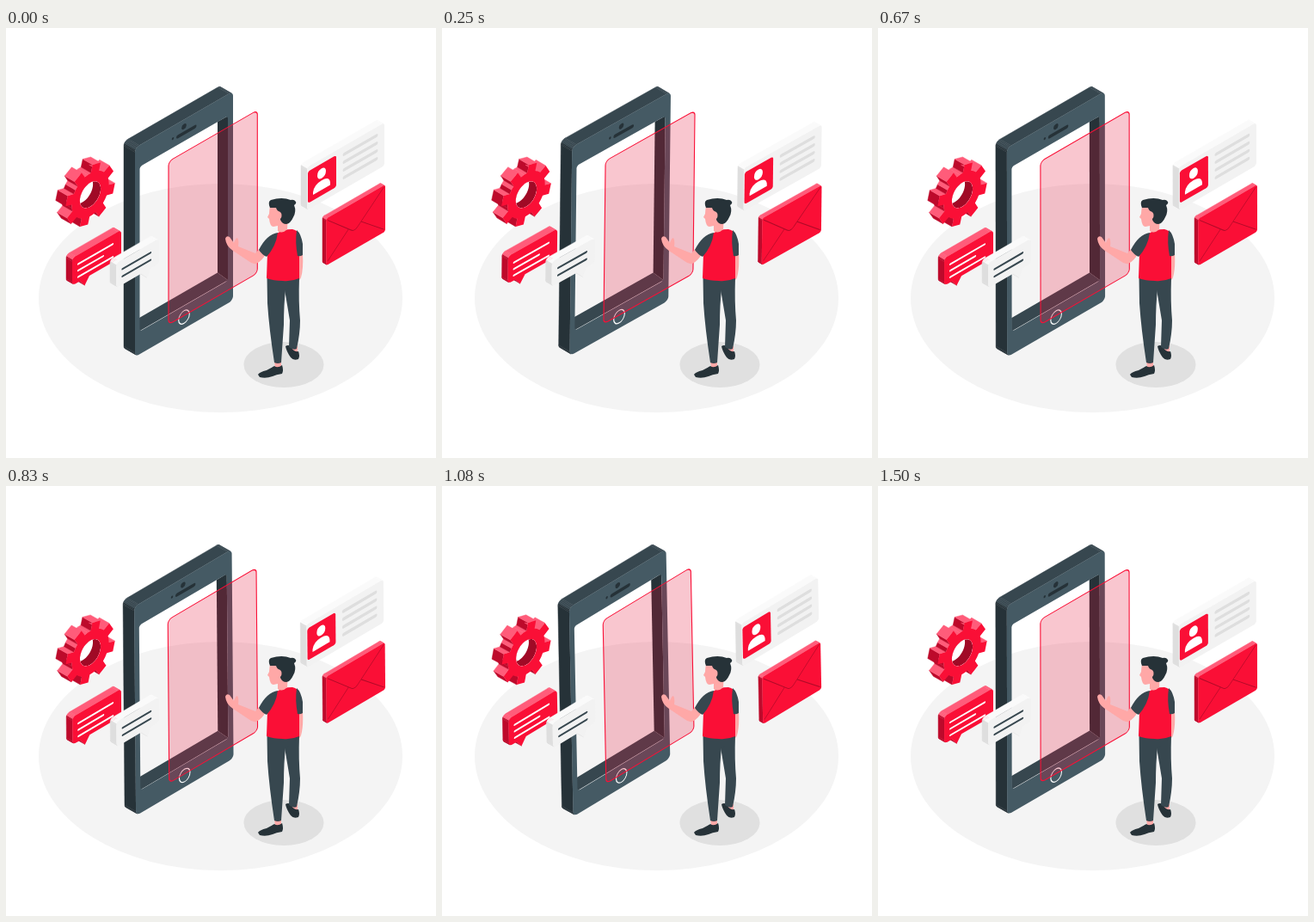
These frames come from a looping animation (500x500 px, 1540 ms). An HTML page:

```html
<!DOCTYPE html>
<html lang="en">
<head>
<meta charset="utf-8">
<style>
html, body { margin: 0; height: 100%; overflow: hidden; background: #fff; }
svg { display: block; width: 100vw; height: 100vh; }
</style>
</head>
<body>
<svg viewBox="0 0 500 500">
  <ellipse cx="249.5" cy="314" rx="211.5" ry="133" fill="#f4f4f4"/>
  <ellipse cx="323" cy="391.5" rx="46.5" ry="26.5" fill="#e0e0e0"/>
  <g id="gear"></g>
  <g id="scene"></g>
  <g id="envelope"></g>
  <g id="man">
    <path fill="#ffa8a7" d="M339 262L345 262Q346 280 343 290Q341 296 338 291Q341 280 339 262ZM303 261Q298 271 291 274Q287 275 282 271L264 259Q256 254 255 245Q256 241 260 243L265 250Q267 244 269 244Q271 246 270 254L290 262L297 254ZM312 387L320 387L320 395L313 395ZM331 368L339 370L339 380L333 379Z"/>
    <path fill="#263238" d="M293 403Q295 400 303 398Q309 395 312 393Q316 396 321 392Q323 398 321 402Q314 403 310 405Q302 408 295 406ZM325 370Q328 368 331 370Q334 377 340 376Q342 381 340 385Q334 387 331 383Q326 376 325 370Z"/>
    <path fill="#37474f" d="M322 290L341 290Q340 318 342 340Q342 355 338 373Q334 375 329 371L330 340L324 304Z"/>
    <path fill="#37474f" d="M303.500 288L338 291Q336 301 325 304Q323 322 323 345L320 389Q316 391 312 389Q306 350 304 320Z"/>
    <path fill="#fa0f36" d="M315 239Q322 234 333 234Q340 235 341 242L341 291Q332 295 322 294Q311 294 303 291L304 262Z"/>
    <path fill="#37474f" d="M316 238Q314 254 303 266Q297 263 294 258Q303 240 316 238ZM338 235Q343 239 345 251L345 264Q342 266 339 265Q336 249 338 235Z"/>
    <path fill="#ffa8a7" d="M307 207Q306 213 306 216L304 220L306 222Q307 231 311 231L316 230L316 236Q321 240 327 234L328 216L320 205Z"/>
    <path fill="#263238" d="M307 209Q304 202 308 200Q321 196 331 200Q335 199 337 202Q338 204 335 206Q338 213 334 220Q331 227 326 228Q321 228 319 223L319 214Q315 213 314 209Z"/>
    <ellipse cx="317" cy="218" rx="3.500" ry="4.200" fill="#ffa8a7"/>
  </g>
</svg>
<script>
const SLOPE = 0.577, PERIOD = 1540;
const RED = ['#fa0f36', '#ff5c7a', '#bd0a2b'];
const WHITE = ['#f2f2f2', '#fafafa', '#dedede'];
const METAL = ['#455a64', '#37474f', '#263238'];
const byId = id => document.getElementById(id);

const outline = points => 'M' + points.map(p => p.map(n => n.toFixed(2))).join('L') + 'Z';
const path = (d, attrs) => `<path d="${d}" ${attrs}/>`;
const lines = (d, color, width) =>
  path(d, `fill="none" stroke="${color}" stroke-width="${width}" stroke-linecap="round" stroke-linejoin="round"`);
const oval = (x, y, rx, ry, attrs) => `<ellipse cx="${x}" cy="${y}" rx="${rx}" ry="${ry}" ${attrs}/>`;

// Points of a rounded rectangle, clockwise, with an optional tail on the bottom edge.
function roundRect(x, y, w, h, r, tail = []) {
  const corner = (cx, cy, from) => [0, 1, 2, 3, 4, 5, 6].map(i => {
    const a = (from + i * 15) * Math.PI / 180;
    return [cx + r * Math.cos(a), cy + r * Math.sin(a)];
  });
  return [...corner(x + r, y + r, 180), ...corner(x + w - r, y + r, 270),
    ...corner(x + w - r, y + h - r, 0), ...tail, ...corner(x + r, y + h - r, 90)];
}

function gearPoints(inner, outer) {
  const points = [];
  for (let k = 0; k < 8; k++) {
    for (const [turn, r] of [[-13, inner], [-9.5, outer], [9.5, outer], [13, inner], [22.5, inner]]) {
      const a = (k * 45 - 30 + turn) * Math.PI / 180;
      points.push([0.866 * r * Math.cos(a), r * Math.sin(a)]);
    }
  }
  return points;
}

const ring = (r, dx = 0, dy = 0) => Array.from({ length: 40 }, (_, i) => {
  const a = i * Math.PI / 20;
  return [dx + 0.866 * r * Math.cos(a), dy + r * Math.sin(a)];
});

// Upright isometric plane: x runs up to the right, y straight down.
const plane = (x, y, content) => `<g transform="matrix(1 ${-SLOPE} 0 1 ${x} ${y})">${content}</g>`;

// Front face plus the visible top and left walls; holes are cut out of the face.
function slab(points, depth, [face, top, side], hole = []) {
  const dx = -depth, dy = -depth * 2 * SLOPE;
  let walls = '';
  points.forEach(([ax, ay], i) => {
    const [bx, by] = points[(i + 1) % points.length];
    const nx = by - ay, ny = ax - bx;
    if (nx * dx + ny * dy <= 0) return;
    const color = ny < -Math.abs(nx) * 0.7 ? top : side;
    const quad = [[ax, ay], [bx, by], [bx + dx, by + dy], [ax + dx, ay + dy]];
    walls += path(outline(quad), `fill="${color}" stroke="${color}" stroke-width=".4"`);
  });
  const cut = hole.length ? outline(hole) : '';
  return walls + path(outline(points) + cut, `fill="${face}" fill-rule="evenodd"`);
}

byId('gear').innerHTML = plane(98, 193.8,
  `<clipPath id="bore">${path(outline(ring(14)), '')}</clipPath>` +
  path(outline(ring(14)) + outline(ring(14, -9, -10.4)), 'fill="#a00a26" fill-rule="evenodd" clip-path="url(#bore)"') +
  slab(gearPoints(25, 33.3), 11.5, RED, ring(14)));

const phone = plane(150, 139.5,
  path('M108 25V216L96 200.500V25Z', 'fill="#263238"') +
  path('M5 216H108L96 200.500H5Z', 'fill="#37474f"') +
  slab(roundRect(0, 0, 114, 243, 5), 13, METAL, roundRect(5.5, 25, 102.5, 191.5, 3)) +
  lines('M50 15.500H69.500', '#263238', 4) +
  oval(57, 8, 2.8, 3, 'fill="#263238"') + oval(44, 14.5, 1.2, 1.4, 'fill="#263238"') +
  oval(57, 229.5, 6.3, 7.3, 'fill="none" stroke="#fff" stroke-width="1.1"'));

const glass = plane(189, 155.2, path(outline(roundRect(0, 0, 103.3, 189.5, 5)),
  'fill="#e60c33" fill-opacity=".23" stroke="#fa0f36" stroke-width="1.1"'));

const redBubble = plane(77, 267.5,
  slab(roundRect(0, 0, 57, 32, 4, [[20, 32], [14.5, 40], [9, 32]]), 7, RED) +
  lines('M7 11H47M7 18.500H36M7 26H47', '#fff', 2.2));

const whiteBubble = plane(128, 273.5,
  slab(roundRect(0, 0, 50, 29, 4, [[40, 29], [36, 37.5], [29, 29]]), 7, WHITE) +
  lines('M7.500 11H40M7.500 19.500H40', '#37474f', 2.3));

const card = plane(350, 162,
  slab(roundRect(0, 0, 90, 50, 3), 7, WHITE) +
  path(outline(roundRect(1, 5.5, 33, 37, 2.5)), 'fill="#fa0f36"') +
  oval(17, 16.8, 5, 5.8, 'fill="#fff"') +
  path('M7 36V33Q8 25 17 25Q26 25 27 33V36Z', 'fill="#fff"') +
  lines('M43.500 9.800H80.500M43.500 18.800H80.500M43.500 27.800H80.500M43.500 36.800H80.500', '#dedede', 3.8));

byId('scene').innerHTML = phone + glass + redBubble + whiteBubble + card;

byId('envelope').innerHTML = plane(372.3, 221.8,
  slab(roundRect(0, 0, 68.7, 54.5, 2.5), 4.3, RED) +
  lines('M2 3L29 30Q33 34 37 30L67 2M2 50L26 27M41 27L67 51', '#b00a28', 0.8));

const pivots = { scene: '250 250', gear: '92 190', envelope: '404 228' };
const triangle = p => 1 - 4 * Math.abs((p + 0.25) % 1 - 0.5);
const PHASE = 0.04;

function draw(now) {
  const angle = triangle(now / PERIOD + PHASE) - triangle(PHASE);
  for (const id in pivots) byId(id).setAttribute('transform', `rotate(${angle} ${pivots[id]})`);
  requestAnimationFrame(draw);
}
draw(performance.now());
</script>
</body>
</html>
```
